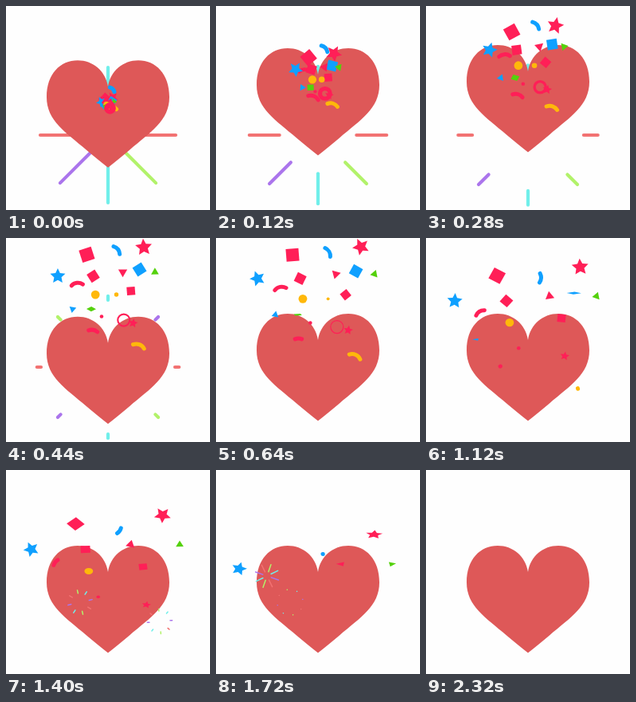
Recreate the animation shown at these times as an HTML page with a canvas. Size 256 px wide and 256 px high, loop 3000 ms.

```html
<!DOCTYPE html>
<html lang="en">
<head>
<meta charset="utf-8">
<title>Heart confetti</title>
<style>
html, body { margin: 0; width: 100%; height: 100%; overflow: hidden; background: #fefefe; }
canvas { display: block; width: 100vw; height: 100vh; }
</style>
</head>
<body>
<canvas></canvas>
<script>
const LOOP = 3000;
const PINK = '#ff1f57', BLUE = '#0fa0ff', GOLD = '#ffb80a', GREEN = '#54d10c';
const RAYS = ['#f27272', '#b2f26a', '#70efea', '#ab75ec'];
const canvas = document.querySelector('canvas');
const ctx = canvas.getContext('2d');
const rad = d => d * Math.PI / 180;
const mix = (a, b, u) => a + (b - a) * u;
const heart = new Path2D('M128 128C125 108 109 95 90 95C68 95 51 112 51 141C51 171 75 185 101 207.5' +
  'C110 215 120 223 128 229.5C136 223 146 215 155 207.5C181 185 205 171 205 141C205 112 188 95 166 95C147 95 131 108 128 128Z');

// dx, dy: launch reach; size; rot + spin * t in degrees; end: time the piece has flipped flat
const pieces = [
  ['square', PINK, -43, -161, 16, -48, .068, 1660],
  ['star', PINK, 72.5, -172, 11, 114, -.105, 1880],
  ['star', BLUE, -102, -129, 10, 44, -.1, 2200],
  ['square', PINK, -30, -129, 12, 36, -.156, 1660],
  ['square', BLUE, 64, -139, 13, 32, -.145, 1148],
  ['triangle', PINK, 30, -135, 6.5, 27, .075, 1860],
  ['triangle', GREEN, 95.3, -135, 5.6, 220, -.5, 1930],
  ['square', PINK, 46.6, -107, 10.3, -38, .28, 1660],
  ['dot', GOLD, -25.6, -101.5, 5.4, 0, 0, 1660],
  ['fade', GOLD, 17, -101.5, 4.4, 0, 0, 1150],
  ['triangle', BLUE, -72, -80, 5, -62, .3, 1175],
  ['square', GREEN, -34, -80, 8.5, -20, .15, 825, 1.2],
  ['dot', PINK, -13, -69, 2.3, 0, 0, 1660],
  ['ring', PINK, 32, -63.5, 6.4, 0, 0, 850],
  ['star', PINK, 51, -59, 6, 10, 0, 1660]
];

// ribbons: a dash sliding along a circle until it closes up at angle `stop`
const ribbons = [
  { color: BLUE, dx: 6, dy: -146, lift: 12.5, r: 11, tail: -76, head: -14, stop: 90, pt: 2.86, ph: 1.8, end: 1730 },
  { color: PINK, dx: -61, dy: -106, lift: 0, r: 11, tail: -55, head: -125, stop: -172, pt: 3, ph: 1, end: 1700 },
  { color: GOLD, dx: 57.5, dy: -15, lift: 0, r: 11, tail: -112, head: -38, stop: -13, pt: 6, ph: 1, end: 1126 },
  { color: PINK, dx: -33, dy: -36, lift: 0, r: 11, tail: -22, head: -106, stop: -118, pt: 1.3, ph: 1, end: 1130 }
];

// x, y, start, rotation of the small bursts
const sparks = [[193, 190, 1140, 40], [93, 166, 1205, 32], [64, 133, 1700, 64], [133, 113.5, 1780, 50]];

// thrown with drag, then falling at terminal speed
function place(dx, dy, t) {
  const tau = t + 45 - 12 * Math.exp(-t / 80);
  const sx = 1 - Math.exp(-.002 * (t + 40));
  const sy = 1 - Math.exp(-.0038 * tau);
  return [128 + dx * sx, 136 + dy * sy + .0777 * (tau - 263 * sy)];
}

const grow = t => 1 - .3 * Math.exp(-t / 70);

function polygon(points, radius, inner) {
  const n = inner ? points * 2 : points;
  for (let i = 0; i < n; i++) {
    const a = i / n * 2 * Math.PI - Math.PI / 2;
    const r = inner && i % 2 ? radius * inner : radius;
    ctx.lineTo(r * Math.cos(a), r * Math.sin(a));
  }
  ctx.closePath();
}

function drawPiece([kind, color, dx, dy, size, rot, spin, end, power = 8], t) {
  if (t >= end) return;
  const [x, y] = place(dx, dy, t), k = grow(t);
  const fade = kind === 'fade' || kind === 'ring';
  ctx.save();
  ctx.translate(x, y);
  ctx.scale(k, fade ? k : k * (1 - (t / end) ** power));
  ctx.rotate(rad(rot + spin * t));
  ctx.fillStyle = ctx.strokeStyle = color;
  ctx.beginPath();
  if (kind === 'square') ctx.rect(-size / 2, -size / 2, size, size);
  else if (kind === 'star') polygon(5, size, .48);
  else if (kind === 'triangle') polygon(3, size);
  else if (kind === 'ring') ctx.arc(0, 0, size + .0025 * t, 0, 7);
  else ctx.arc(0, 0, kind === 'fade' ? size * (1 - t / end) : size, 0, 7);
  if (kind === 'ring') {
    ctx.lineWidth = 8 * Math.exp(-.003 * t);
    ctx.stroke();
  } else ctx.fill();
  ctx.restore();
}

function drawRibbon(b, t) {
  if (t >= b.end) return;
  const u = t / b.end, k = grow(t);
  const [x, y] = place(b.dx, b.dy, t);
  const a = rad(mix(b.tail, b.stop, u ** b.pt));
  const c = rad(mix(b.head, b.stop, u ** b.ph));
  ctx.strokeStyle = b.color;
  ctx.lineWidth = 5;
  ctx.beginPath();
  ctx.arc(x, y - b.lift * k, b.r * k, Math.min(a, c), Math.max(a, c) + .01);
  ctx.stroke();
}

function drawRays(x, y, scale, rot, width, u) {
  if (u < 0 || u >= 1) return;
  const outer = (85 + 6 * u) * scale;
  const inner = outer - 58 * scale * (1 - u) ** 2;
  ctx.lineWidth = width;
  for (let i = 0; i < 8; i++) {
    const a = rad(rot + i * 45), c = Math.cos(a), s = Math.sin(a);
    ctx.strokeStyle = RAYS[i % 4];
    ctx.beginPath();
    ctx.moveTo(x + c * inner, y + s * inner);
    ctx.lineTo(x + c * outer, y + s * outer);
    ctx.stroke();
  }
}

function hop(t) {
  if (t < 250) return mix(-26.5, -49, Math.sin(t / 250 * Math.PI / 2));
  if (t < 450) return mix(-49, 4, (1 - Math.cos((t - 250) / 200 * Math.PI)) / 2);
  if (t < 650) return mix(4, 0, (1 - Math.cos((t - 450) / 200 * Math.PI)) / 2);
  return 0;
}

function draw(t) {
  const d = devicePixelRatio || 1;
  const w = Math.round(innerWidth * d), h = Math.round(innerHeight * d);
  if (canvas.width !== w || canvas.height !== h) {
    canvas.width = w;
    canvas.height = h;
  }
  ctx.setTransform(w / 256, 0, 0, h / 256, 0, 0);
  ctx.fillStyle = '#fefefe';
  ctx.fillRect(0, 0, 256, 256);
  ctx.lineCap = 'round';
  drawRays(128, 162, 1, 0, 4.2, t / 630);
  ctx.save();
  ctx.translate(0, hop(t));
  ctx.fillStyle = '#de5858';
  ctx.fill(heart);
  ctx.restore();
  ribbons.forEach(b => drawRibbon(b, t));
  pieces.forEach(p => drawPiece(p, t));
  sparks.forEach(([x, y, start, rot]) => drawRays(x, y, .178, rot, 1.5, (t - start) / 520));
}

const begin = performance.now();
function tick() {
  draw((performance.now() - begin) % LOOP);
  requestAnimationFrame(tick);
}
tick();
</script>
</body>
</html>
```
